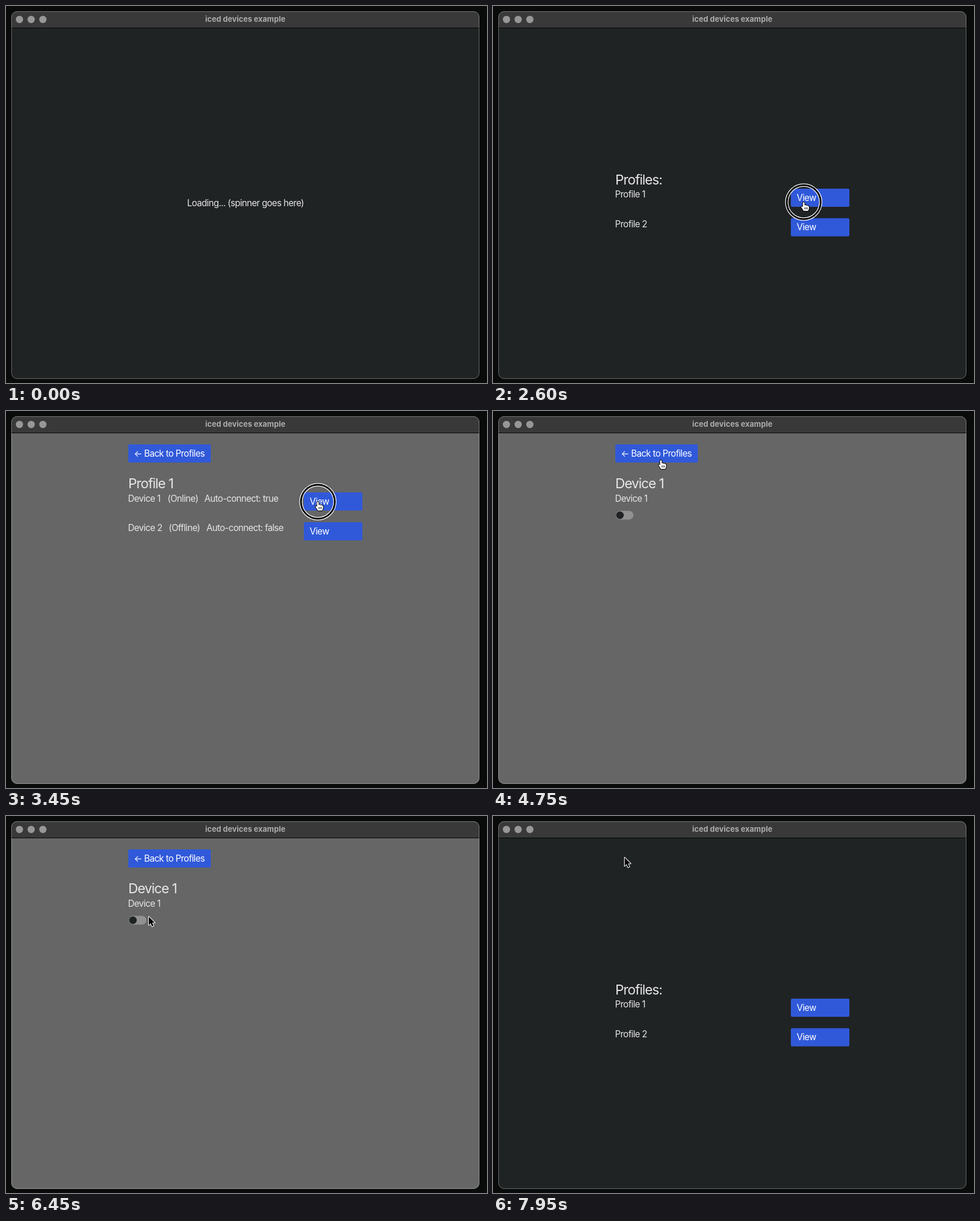
These frames come from a looping animation (822x644 px, 8 s). An HTML page with a canvas:

```html
<!DOCTYPE html>
<html lang="en">
<head>
<meta charset="utf-8">
<title>iced devices example</title>
<style>
html, body { margin: 0; width: 822px; height: 644px; overflow: hidden; background: #090a0a; }
canvas { display: block; }
</style>
</head>
<body>
<canvas id="stage" width="822" height="644"></canvas>
<script>
const ctx = document.getElementById('stage').getContext('2d');
const LOOP = 8000, STEP = 50;
const DARK = '#202324', GRAY = '#666666', BLUE = '#3059da', INK = '#e7e7e7';

// [start, page]
const pages = [[0, 'loading'], [1200, 'profiles'], [2700, 'profile'], [3550, 'device'],
  [5200, 'profile'], [6050, 'device'], [7650, 'profile'], [7850, 'profiles']];
// [press, release]
const clicks = [[2550, 2700], [3400, 3550], [5050, 5200], [5950, 6050],
  [6650, 6800], [7600, 7650], [7750, 7850]];
// [time, x, y] of the pointer's hot spot
const path = [[2200, 565, 590], [2500, 531, 335], [2700, 531, 335], [3050, 533, 163],
  [3250, 533, 155], [4350, 533, 155], [4750, 287, 84], [5000, 283, 75], [5250, 283, 75],
  [5750, 533, 160], [6000, 533, 155], [6100, 533, 155], [6450, 244, 172], [6600, 230, 178],
  [6950, 230, 178], [7550, 283, 90], [7650, 265, 78], [7950, 225, 71]];
const TOGGLE_TIME = 6800;

const arrow = new Path2D('M0 0V14.2L3.2 11.2 5.6 16.6 8.1 15.5 5.8 10.3H10.2Z');
const hand = new Path2D('M-1.4 1.2Q0-1 1.4 1.2V5.5Q3 4.3 4.2 6Q6 5 6.8 6.6Q9 6 9 8.5V11' +
  'Q8.5 13 7.3 15H0Q-1.5 12.5-4 9Q-4.5 7-2.5 7.6L-1.4 8.6Z');
const fingers = new Path2D('M1.8 9V12.5M4 9V12.5M6.2 9V12.5');

let hotspots;

function text(str, x, y, color = INK, font = '15.3px', spacing = -0.038) {
  ctx.font = `${font} Inter, sans-serif`;
  ctx.letterSpacing = `${parseFloat(font.split(' ').pop()) * spacing}px`;
  ctx.fillStyle = color;
  ctx.fillText(str, x, y);
}

const heading = (str, y) => text(str, 209, y, INK, '23.2px', -0.045);

function box(x, y, w, h, r, fill) {
  ctx.beginPath();
  ctx.roundRect(x, y, w, h, r);
  ctx.fillStyle = fill;
  ctx.fill();
}

function circle(x, y, r) {
  ctx.beginPath();
  ctx.arc(x, y, r, 0, Math.PI * 2);
}

function disc(x, y, r, fill) {
  circle(x, y, r);
  ctx.fillStyle = fill;
  ctx.fill();
}

function button(x, y, w, h = 31) {
  box(x, y, w, h, 2, BLUE);
  hotspots.push([x, y, w, h]);
}

function viewButton(y) {
  button(509, y, 100);
  text('View', 519, y + 20.5, '#fff');
}

function backButton() {
  button(209, 57, 141);
  text('←', 218.5, 78, '#fff');
  text('Back to Profiles', 236, 78, '#fff');
}

const draw = {
  loading() {
    text('Loading... (spinner goes here)', 309.5, 342);
  },
  profiles() {
    heading('Profiles:', 305);
    text('Profile 1', 208.5, 327);
    viewButton(312);
    text('Profile 2', 208.5, 378);
    viewButton(362.5);
  },
  profile() {
    backButton();
    heading('Profile 1', 132);
    text('Device 1', 208.5, 155);
    text('(Online)', 276, 155);
    text('Auto-connect: true', 339, 155);
    viewButton(139);
    text('Device 2', 208.5, 205);
    text('(Offline)', 278, 205);
    text('Auto-connect: false', 342.5, 205);
    viewButton(190);
  },
  device(t) {
    const on = t >= TOGGLE_TIME;
    backButton();
    heading('Device 1', 132);
    text('Device 1', 208.5, 155);
    box(210, 170.5, 30, 15, 7.5, on ? BLUE : '#929192');
    disc(on ? 232.8 : 217, 178, 6.5, on ? '#fff' : DARK);
    hotspots.push([210, 170, 30, 16]);
  }
};

function drawWindow(background) {
  ctx.fillStyle = '#090a0a';
  ctx.fillRect(0, 0, 822, 644);
  ctx.save();
  ctx.beginPath();
  ctx.roundRect(9, 9, 800, 628, 10);
  ctx.clip();
  ctx.fillStyle = background;
  ctx.fillRect(9, 9, 800, 628);
  ctx.fillStyle = '#393939';
  ctx.fillRect(9, 9, 800, 28);
  ctx.fillStyle = '#050505';
  ctx.fillRect(9, 37, 800, 1);
  ctx.restore();
  ctx.beginPath();
  ctx.roundRect(9.5, 9.5, 799, 627, 9.5);
  ctx.lineWidth = 1;
  ctx.strokeStyle = 'rgba(255,255,255,.32)';
  ctx.stroke();
  for (const x of [23, 43, 63]) disc(x, 23, 6.2, '#979797');
  ctx.textAlign = 'center';
  text('iced devices example', 409, 27, '#acacac', '700 13px', 0);
  ctx.textAlign = 'left';
}

function pointerAt(t) {
  const i = path.findIndex(p => p[0] > t);
  if (i < 0) return path.at(-1).slice(1);
  const [t0, x0, y0] = path[i - 1], [t1, x1, y1] = path[i];
  const k = (t - t0) / (t1 - t0), e = k * k * (3 - 2 * k);
  return [x0 + (x1 - x0) * e, y0 + (y1 - y0) * e];
}

function outline(shape, fill, stroke, width) {
  ctx.lineJoin = 'round';
  ctx.lineWidth = width;
  ctx.strokeStyle = stroke;
  ctx.stroke(shape);
  ctx.fillStyle = fill;
  ctx.fill(shape);
}

function drawPointer(t) {
  const [x, y] = pointerAt(t);
  if (clicks.some(([down, up]) => t >= down && t < up)) {
    circle(x, y, 29);
    for (const [width, color] of [[5.4, '#fff'], [3, '#000']]) {
      ctx.lineWidth = width;
      ctx.strokeStyle = color;
      ctx.stroke();
    }
  }
  const over = hotspots.some(([bx, by, w, h]) => x >= bx && x <= bx + w && y >= by && y <= by + h);
  ctx.save();
  ctx.translate(x, y);
  if (over) {
    outline(hand, '#fff', '#000', 2);
    ctx.lineWidth = 0.9;
    ctx.stroke(fingers);
  } else {
    outline(arrow, '#000', '#fff', 2);
  }
  ctx.restore();
}

function frame(now) {
  const t = Math.floor(now % LOOP / STEP) * STEP;
  const page = pages.findLast(p => p[0] <= t)[1];
  hotspots = [];
  drawWindow(page === 'profile' || page === 'device' ? GRAY : DARK);
  draw[page](t);
  if (t >= path[0][0]) drawPointer(t);
  requestAnimationFrame(() => frame(performance.now() - start));
}

const start = performance.now();
frame(0);
</script>
</body>
</html>
```
